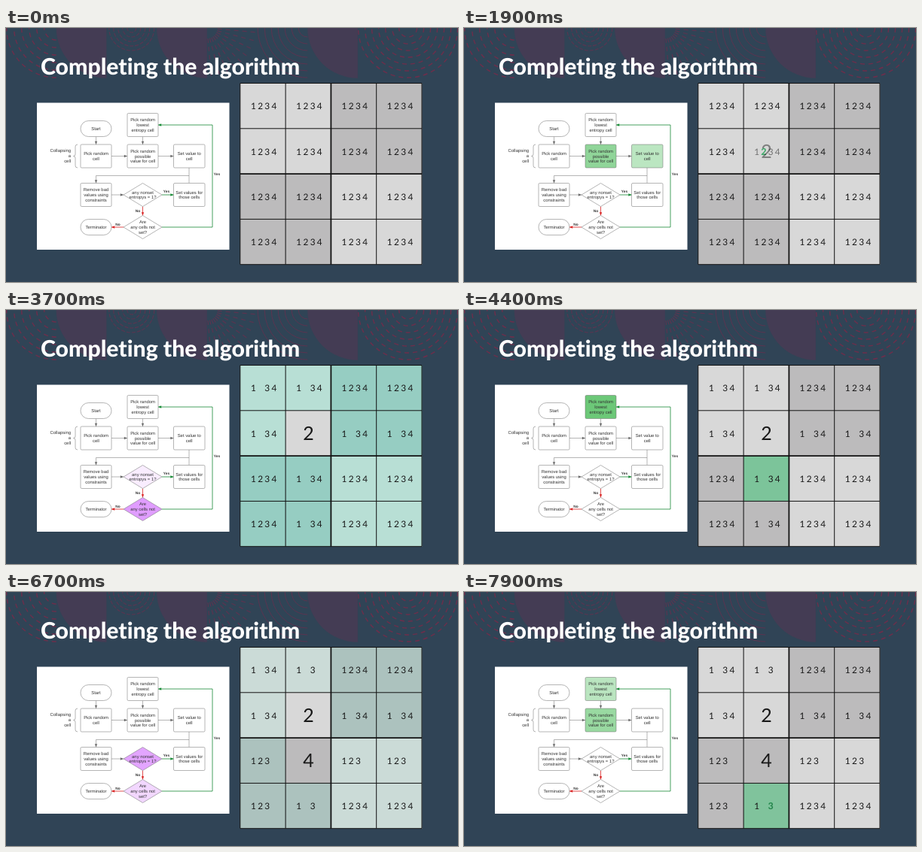
An HTML page with a canvas for the animation above (8000 ms loop, 600 by 338 pixels).

```html
<!DOCTYPE html>
<html lang="en">
<head>
<meta charset="utf-8">
<title>Completing the algorithm</title>
<style>
html, body { margin: 0; width: 100%; height: 100%; overflow: hidden; background: #304456; }
canvas { display: block; width: 600px; height: 338px; }
</style>
</head>
<body>
<canvas id="stage"></canvas>
<script>
const W = 600, H = 338, LOOP = 8000;
const FIRST = 640, STEP = 537; // time of step 0 and length of one step
const canvas = document.getElementById('stage');
const ctx = canvas.getContext('2d');
const ratio = window.devicePixelRatio || 1;
canvas.width = W * ratio;
canvas.height = H * ratio;
ctx.textRendering = 'geometricPrecision';

const GREEN = [108, 200, 120], RED = [238, 38, 38], PURPLE = [222, 150, 255];
const INK = '#6a6a6a', TEXT = '#333', YES = '#178a35', NO = '#d92222';
const SANS = '"Liberation Sans", Arial, sans-serif';
const LATO = 'Lato, "Open Sans", sans-serif';

// Flowchart nodes: kind, box, lines of text, highlight colour, steps that light it
const nodes = [
  ['pill', 99, 123.5, 41, 21, ['Start'], RED, [-1]],
  ['box', 161, 113.5, 41, 31, ['Pick random', 'lowest', 'entropy cell'], GREEN, [6, 12]],
  ['box', 99, 155, 41, 31, ['Pick random', 'cell'], GREEN, [0]],
  ['box', 161, 155, 41, 31, ['Pick random', 'possible', 'value for cell'], GREEN, [1, 7, 13]],
  ['box', 222.5, 155, 41.5, 31, ['Set value to', 'cell'], GREEN, [2, 8]],
  ['box', 99, 206.5, 41, 31, ['Remove bad', 'values using', 'constraints'], PURPLE, [3, 9]],
  ['diamond', 156, 206.5, 51, 31, ['any nonset', 'entropys = 1?'], PURPLE, [4, 10]],
  ['box', 222.5, 206.5, 41.5, 31, ['Set values for', 'those cells'], GREEN, []],
  ['pill', 99, 254.5, 41, 21, ['Terminator'], RED, []],
  ['diamond', 156, 249.5, 51, 31, ['Are', 'any cells not', 'set?'], PURPLE, [5, 11]]
];

// Collapsed cells: row, column, value, step of picking the cell, picking and setting the value
const picks = [
  { r: 1, c: 1, v: 2, cell: 0, value: 1, set: 2 },
  { r: 2, c: 1, v: 4, cell: 6, value: 7, set: 8 },
  { r: 3, c: 1, v: 3, cell: 12, value: 13, set: 14 }
];

const clamp = x => Math.max(0, Math.min(1, x));
const rise = (pos, k) => clamp((pos - k) / 0.75);
const fall = (pos, k) => clamp((pos - k - 1.2) / 0.6);
const glow = (pos, k) => rise(pos, k) * (1 - fall(pos, k));
const mix = (a, b, f) => a.map((x, i) => x + (b[i] - x) * f);
const rgb = c => `rgb(${c.map(Math.round).join()})`;

function label(str, x, y, font, color, align = 'center') {
  ctx.font = font;
  ctx.fillStyle = color;
  ctx.textAlign = align;
  ctx.fillText(str, x, y);
}

function path(points, color, width = 0.5) {
  ctx.strokeStyle = color;
  ctx.lineWidth = width;
  ctx.beginPath();
  points.forEach(([x, y]) => ctx.lineTo(x, y));
  ctx.stroke();
}

function arrow(points, color, width) {
  path(points, color, width);
  const [[px, py], [x, y]] = points.slice(-2);
  ctx.save();
  ctx.translate(x, y);
  ctx.rotate(Math.atan2(y - py, x - px));
  ctx.fillStyle = color;
  ctx.beginPath();
  ctx.moveTo(0, 0);
  ctx.lineTo(-4.2, -1.7);
  ctx.lineTo(-4.2, 1.7);
  ctx.fill();
  ctx.restore();
}

function rings(x, y, from, to, gap, start, end, dash, color, width) {
  ctx.strokeStyle = color;
  ctx.lineWidth = width;
  ctx.setLineDash(dash);
  for (let r = from; r <= to; r += gap) {
    ctx.beginPath();
    ctx.arc(x, y, r, start * Math.PI, end * Math.PI);
    ctx.stroke();
  }
  ctx.setLineDash([]);
}

function rays(x, y, from, to, count, dash, color) {
  ctx.setLineDash(dash);
  for (let i = 0; i < count; i++) {
    const a = (i + 0.5) / count * Math.PI / 2;
    const dx = Math.cos(a), dy = Math.sin(a);
    path([[x + dx * from, y + dy * from], [x + dx * to, y + dy * to]], color, 1.2);
  }
  ctx.setLineDash([]);
}

function quarter(x, r) {
  ctx.fillStyle = '#443c54';
  ctx.beginPath();
  ctx.moveTo(x, 0);
  ctx.arc(x, 0, r, Math.PI / 2, Math.PI);
  ctx.fill();
}

function backdrop() {
  ctx.fillStyle = '#304456';
  ctx.fillRect(0, 0, W, H);
  const line = '#5b3450', dash = '#6d2e4b', tile = 66.7;
  rings(tile, 0, 16, 66, 10, 0.5, 1, [6, 5], dash, 1.4);
  for (const i of [2, 4, 7]) quarter(i * tile, tile);
  rings(2.5 * tile, 0, 6, 33, 6, 0, 1, [5, 2], line, 1.1);
  rays(4 * tile, 0, 14, 66, 9, [6, 5], line);
  rings(6 * tile, 0, 12, 66, 9, 0.5, 1, [], line, 1);
  rings(8 * tile, 0, 12, 66, 9, 0, 1, [6, 5], dash, 1.4);
  ctx.letterSpacing = '-0.01px'; // keeps "t" and "i" apart
  label('Completing the algorithm', 46, 61.5, '800 30.2px ' + LATO, '#fff', 'left');
  ctx.letterSpacing = '0px';
}

function shape(kind, x, y, w, h) {
  ctx.beginPath();
  if (kind === 'diamond') {
    ctx.moveTo(x + w / 2, y);
    ctx.lineTo(x + w, y + h / 2);
    ctx.lineTo(x + w / 2, y + h);
    ctx.lineTo(x, y + h / 2);
    ctx.closePath();
  } else {
    ctx.roundRect(x, y, w, h, kind === 'pill' ? h / 2 : 1.5);
  }
}

function flowchart(pos) {
  ctx.fillStyle = '#fff';
  ctx.fillRect(41, 99.5, 255.5, 195.5);

  arrow([[119.5, 144.5], [119.5, 155]], INK);
  arrow([[181.5, 144.5], [181.5, 155]], INK);
  arrow([[140, 170.5], [161, 170.5]], INK);
  arrow([[202, 170.5], [222.5, 170.5]], INK);
  path([[243, 186], [243, 206.5]], INK);
  arrow([[243, 196.5], [119.5, 196.5], [119.5, 206.5]], INK);
  arrow([[140, 222], [156, 222]], INK);
  arrow([[207, 222], [222.5, 222]], YES, 0.8);
  arrow([[181.5, 237.5], [181.5, 249.5]], NO, 0.8);
  arrow([[156, 265], [140, 265]], NO, 0.8);
  arrow([[207, 265], [274, 265], [274, 129], [202, 129]], YES, 0.8);

  const font = '5.9px ' + SANS;
  for (const [kind, x, y, w, h, lines, color, steps] of nodes) {
    const f = Math.max(0, ...steps.map(k => glow(pos, k)));
    shape(kind, x, y, w, h);
    ctx.fillStyle = rgb(mix([255, 255, 255], color, f));
    ctx.fill();
    ctx.strokeStyle = INK;
    ctx.lineWidth = 0.5;
    ctx.stroke();
    lines.forEach((s, i) => label(s, x + w / 2,
      y + h / 2 + 2 + (i - (lines.length - 1) / 2) * 6.9, font, TEXT));
  }

  ['Collapsing', 'a', 'cell'].forEach((s, i) =>
    label(s, 86, 165 + i * 6.9, font, TEXT, 'right'));
  ctx.strokeStyle = INK;
  ctx.beginPath();
  ctx.moveTo(95, 155);
  ctx.quadraticCurveTo(92, 155, 92, 158);
  ctx.lineTo(92, 168);
  ctx.quadraticCurveTo(92, 170.5, 89.5, 170.5);
  ctx.quadraticCurveTo(92, 170.5, 92, 173);
  ctx.lineTo(92, 183);
  ctx.quadraticCurveTo(92, 186, 95, 186);
  ctx.stroke();

  const bold = 'bold 4.8px ' + SANS;
  label('Yes', 213, 219, bold, TEXT);
  label('Yes', 280, 196, bold, TEXT);
  label('No', 175, 244.5, bold, TEXT);
  label('No', 148.5, 262.5, bold, TEXT);
}

const sees = (p, r, c) => p.r === r || p.c === c ||
  (p.r >> 1 === r >> 1 && p.c >> 1 === c >> 1);

function digits(pos, r, c, x, y, own) {
  for (let d = 1; d <= 4; d++) {
    let alpha = 1;
    for (const p of picks) {
      if (p.v === d && p !== own && sees(p, r, c)) alpha *= 1 - rise(pos, p.set + 1);
    }
    const dx = x + 1 + (d - 2.5) * 9.2, dy = y + 4.8;
    let plain = alpha;
    if (own) {
      plain *= 1 - rise(pos, own.set);
      if (own.v === d) {
        const g = rise(pos, own.value);
        plain *= 1 - g;
        ctx.globalAlpha = g * (1 - fall(pos, own.value));
        label(d, dx, dy, '800 12.5px ' + LATO, '#109a48');
      }
    }
    ctx.globalAlpha = plain;
    label(d, dx, dy, '11.8px ' + LATO, '#181818');
  }
  if (own) {
    ctx.globalAlpha = rise(pos, own.set);
    label(own.v, x, y + 9.2, '25px ' + LATO, '#181818');
  }
  ctx.globalAlpha = 1;
}

function grid(pos) {
  const left = 310.8, top = 73.5, size = 60.3;
  const check = Math.max(glow(pos, 5), glow(pos, 11));
  for (let r = 0; r < 4; r++) {
    for (let c = 0; c < 4; c++) {
      const own = picks.find(p => p.r === r && p.c === c);
      const light = r >> 1 === c >> 1;
      let fill = light ? [216, 216, 216] : [188, 187, 188];
      if (!own || pos < own.set) fill = mix(fill, light ? [182, 224, 213] : [147, 206, 194], check);
      if (own) fill = mix(fill, [60, 205, 120], Math.min(0.5, glow(pos, own.cell)));
      const x = left + c * size, y = top + r * size;
      ctx.fillStyle = rgb(fill);
      ctx.fillRect(x, y, size + 0.3, size + 0.3);
      digits(pos, r, c, x + size / 2 + 0.2, y + size / 2, own);
    }
  }
  for (let i = 0; i <= 4; i++) {
    const p = i * size, end = 4 * size, width = i === 2 ? 1.8 : 1;
    path([[left + p, top], [left + p, top + end]], '#111', width);
    path([[left, top + p], [left + end, top + p]], '#111', width);
  }
}

function draw(time) {
  const pos = (time % LOOP - FIRST) / STEP;
  ctx.setTransform(ratio, 0, 0, ratio, 0, 0);
  backdrop();
  flowchart(pos);
  grid(pos);
}

let begin;
function tick(now) {
  begin ??= now;
  draw(now - begin);
  requestAnimationFrame(tick);
}
draw(0);
requestAnimationFrame(tick);
</script>
</body>
</html>
```
